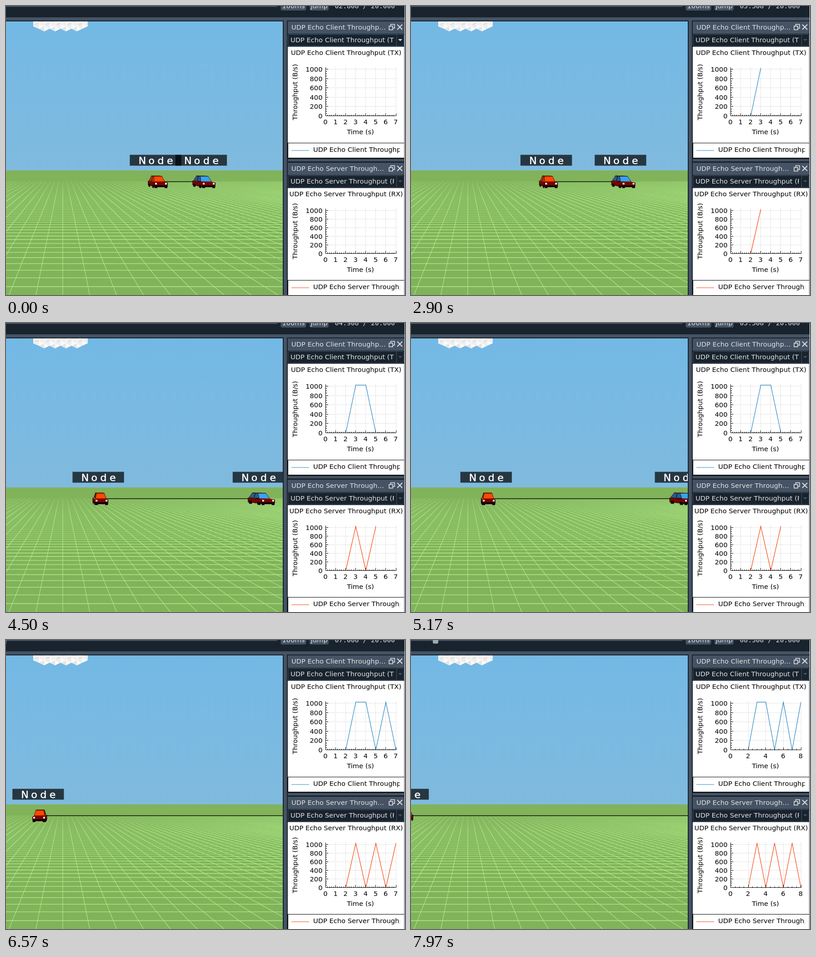
Recreate the animation shown at these times as an HTML page with a canvas. Size 878 by 638 pixels, loop 8 s.

```html
<!DOCTYPE html>
<html lang="en">
<head>
<meta charset="utf-8">
<title>Network simulation playback</title>
<style>
html, body { margin: 0; width: 100%; height: 100%; overflow: hidden; background: #19232d; }
canvas { display: block; }
</style>
</head>
<body>
<canvas id="stage" width="878" height="638"></canvas>
<script>
const c = document.getElementById('stage').getContext('2d');
const LOOP = 8000;
const DARK = '#19232d', SLATE = '#455364', LIGHT = '#e0e1e3';
const SANS = '14.667px "DejaVu Sans", sans-serif';
const MONO = '14.667px "DejaVu Sans Mono", monospace';
// Vanishing point, far edges of the ground and of its grid, depth of a car
const VX = 125, VY = 342, GROUND_Y = 363, GRID_Y = 387, DEPTH = 0.068;

// [time in ms, step count]; one step is a tenth of a simulated second
const SCENE = [[2170, 0], [2970, 6], [3430, 11], [4370, 19], [4500, 20], [4830, 23],
  [5700, 32], [5830, 33], [6230, 38], [6430, 40], [6570, 41], [7970, 55]];
const CLOCK = [[2169, 0], [2170, 1], [3430, 12], [4500, 21], [5830, 33.4], [6570, 42], [7970, 55.4]];
const SAMPLE_AT = [2300, 3420, 4480, 5630, 6570, 7600];
const CLIENT = [0, 1, 1, 0, 1, 0, 1], SERVER = [0, 1, 0, 1, 0, 1, 0];

function stepAt(keys, t) {
  if (t <= keys[0][0]) return keys[0][1];
  for (let i = 1; i < keys.length; i++) {
    const [t0, v0] = keys[i - 1], [t1, v1] = keys[i];
    if (t <= t1) return Math.floor(v0 + (v1 - v0) * (t - t0) / (t1 - t0) + 1e-6);
  }
  return Math.floor(keys[keys.length - 1][1]);
}

const snap = v => Math.floor(v) + 0.5;

function box(color, x, y, w, h) {
  c.fillStyle = color;
  c.fillRect(x, y, w, h);
}

function round(color, x, y, w, h, r) {
  c.fillStyle = color;
  c.beginPath();
  c.roundRect(x, y, w, h, r);
  c.fill();
}

function trace(points) {
  c.beginPath();
  points.forEach(([x, y], i) => i ? c.lineTo(x, y) : c.moveTo(x, y));
}

function poly(points, fill, edge) {
  trace(points);
  c.closePath();
  c.fillStyle = fill;
  c.fill();
  if (edge) {
    c.strokeStyle = edge;
    c.lineWidth = 0.8;
    c.stroke();
  }
}

function line(points, color, width = 1) {
  trace(points);
  c.strokeStyle = color;
  c.lineWidth = width;
  c.stroke();
}

function text(s, x, y, color, align = 'left', font = SANS) {
  c.font = font;
  c.textAlign = align;
  c.fillStyle = color;
  c.fillText(s, x, y);
}

function clipped(x, y, w, h, draw) {
  c.save();
  c.beginPath();
  c.rect(x, y, w, h);
  c.clip();
  draw();
  c.restore();
}

function fade(y0, y1, from, to) {
  const g = c.createLinearGradient(0, y0, 0, y1);
  g.addColorStop(0, from);
  g.addColorStop(1, to);
  return g;
}

function cloud() {
  const edge = [[60, 34], [60, 45], [72, 50]];
  for (let x = 84; x <= 156; x += 24) edge.push([x, 56], [x + 12, 50]);
  edge.push([179.5, 45], [179.5, 34]);
  c.save();
  trace(edge);
  c.clip();
  box('#fafafa', 60, 34, 120, 23);
  for (let row = 0; row < 2; row++) {
    const cy = row ? 45 : 35;
    for (let cx = 60 + (row ? 0 : 12); cx < 190; cx += 24) {
      poly([[cx, cy], [cx - 12, cy + 6], [cx, cy + 11]], '#e5e5e5');
      poly([[cx, cy], [cx + 12, cy - 5], [cx + 12, cy + 6]], '#eeeeee');
      poly([[cx, cy], [cx - 12, cy - 5], [cx, cy - 10]], '#f0f0f0');
    }
  }
  c.restore();
}

function ground() {
  const cell = 0.2, rowStep = 2.7e-4, near = 300, far = GRID_Y - VY;
  box('#81b35b', 0, GROUND_Y, 610, 275);
  const ink = fade(GRID_Y - 2, 425, 'rgba(178,238,138,0.2)', 'rgba(178,238,138,0.95)');
  for (let d = near, n = 1; d > far; d = 1 / (1 / near + n++ * rowStep)) {
    const gap = d * d * rowStep;
    line([[0, VY + d], [610, VY + d]], ink, Math.min(1.3, gap * 0.2));
  }
  for (let j = -14; j < 56; j++) {
    const k = j * cell;
    line([[VX + k * far, VY + far], [VX + k * near, VY + near]], ink, 1.1);
  }
}

function car(cx, glass, sideGlass) {
  const p = (dx, y, z) => {
    const f = 1 - DEPTH * z;
    return [VX + (cx + dx - VX) * f, VY + (y - VY) * f];
  };
  const s = cx > VX ? -1 : 1;
  const wheel = (z, dx) => poly([p(dx, 396, z), p(dx, 402, z), p(dx, 402, z + 0.2), p(dx, 396, z + 0.2)], '#0a0a0a', '#0a0a0a');
  poly([p(-14, 395, 1), p(14, 395, 1), p(14, 400, 0), p(-14, 400, 0)], '#100404');
  poly([p(s * 14.5, 389, 0), p(s * 14.5, 399, 0), p(s * 14.5, 399, 1), p(s * 14.5, 389, 1)], '#780303', '#1a0000');
  wheel(0.72, s * 14.5);
  wheel(0.1, s * 14.5);
  poly([p(s * 12, 388, 0.25), p(s * 9, 377, 0.45), p(s * 9, 377, 0.85), p(s * 12, 388, 1)], sideGlass, '#200000');
  line([p(s * 12, 388, 0.62), p(s * 9, 377, 0.65)], '#300000', 1.2);
  poly([p(-9, 377, 0.45), p(9, 377, 0.45), p(9, 377, 0.85), p(-9, 377, 0.85)], '#8a0000', '#300000');
  poly([p(-14, 390, 0), p(14, 390, 0), p(12, 388.5, 0.25), p(-12, 388.5, 0.25)], '#c80808');
  poly([p(-12, 388.5, 0.25), p(12, 388.5, 0.25), p(9, 377, 0.45), p(-9, 377, 0.45)], glass, '#400000');
  poly([p(-14.5, 390, 0), p(14.5, 390, 0), p(14.5, 397, 0), p(-14.5, 397, 0)], '#7c0404', '#200000');
  for (const dx of [-11, 11]) {
    box('#ffffff', cx + dx - 2, 390.5, 4, 3.5);
    box('#0a0a0a', cx + dx - 3, 397, 6, 5);
  }
  box('#140505', cx - 14.5, 395.5, 29, 4.5);
}

function nodeLabel(x) {
  box('rgba(0,0,0,0.7)', x, 328.5, 113.3, 24);
  c.strokeStyle = '#fff';
  c.lineWidth = 0.5;
  [...'Node'].forEach((ch, i) => {
    const cx = x + 27.5 + i * 20.3;
    text(ch, cx, 349, '#fff', 'center', '22px "DejaVu Sans", sans-serif');
    c.strokeText(ch, cx, 349);
  });
}

function viewport(k) {
  box(fade(34, GROUND_Y, '#73b9e5', '#80bade'), 0, 34, 610, GROUND_Y - 34);
  cloud();
  ground();
  const left = 341 - 6.54 * k, right = 446 + 6.54 * k;
  line([[left, 387.8], [right - 10, 387.8]], '#0a0f08', 1.5);
  car(left, '#ff4a00', '#c93c08');
  car(right, '#33a5f2', '#235f92');
  nodeLabel(272.4 - 6.3 * k);
  nodeLabel(372.8 + 6.3 * k);
}

function toolbar(time) {
  box(DARK, 0, 0, 878, 34);
  box(SLATE, 0, 25, 878, 7);
  box(SLATE, 0, 0, 597, 2);
  round('#9da9b5', 48 + 45.5 * (time - 8.308), -5, 12, 13, 3);
  round(SLATE, 604.5, -10, 56, 20, 4);
  round(SLATE, 668, -10, 42, 20, 4);
  text('100ms', 607.5, 5, LIGHT);
  text('Jump', 670.5, 5, LIGHT);
  text(time.toFixed(3).padStart(6, '0') + ' / 20.000', 723.5, 5, LIGHT, 'left', MONO);
}

function dock(y, title, choice, focus, hot) {
  box(SLATE, 620, y, 256, 27);
  text(title, 628, y + 18, LIGHT);
  c.strokeStyle = LIGHT;
  c.lineWidth = 1.6;
  c.strokeRect(846.5, y + 6.5, 8.5, 8.5);
  box(SLATE, 842, y + 10, 9, 9);
  c.strokeRect(843, y + 10.5, 8, 8);
  line([[861, y + 7], [872, y + 18]], LIGHT, 2);
  line([[872, y + 7], [861, y + 18]], LIGHT, 2);
  box(DARK, 620, y + 27, 256, 29);
  c.strokeStyle = focus ? '#346792' : SLATE;
  c.lineWidth = 1;
  c.beginPath();
  c.roundRect(620.5, y + 28.5, 255, 26, 3);
  c.stroke();
  box(SLATE, 859, y + 29, 1, 25);
  clipped(622, y + 28, 232, 27, () => text(choice, 626, y + 46, LIGHT));
  poly([[863, y + 39], [872, y + 39], [867.5, y + 43.5]], hot ? LIGHT : SLATE);
}

function chart(o, shown) {
  const last = Math.max(7, shown), major = last > 7 ? 2 : 1, minor = last > 7 ? 0.5 : 0.2;
  const px = v => 703.5 + v * 154.5 / last;
  const py = v => o.base - v * o.unit / 200;
  const top = py(1040);
  box('#fff', 620, o.y, 256, o.legend - o.y);
  text(o.name + ' (' + o.dir + ')', 748.5, o.y + 18, '#000', 'center');

  c.setLineDash([1, 2]);
  for (let v = 200; v <= 1000; v += 200) line([[704, snap(py(v))], [858, snap(py(v))]], '#b4b4b4');
  for (let v = major; v <= last; v += major) line([[snap(px(v)), top], [snap(px(v)), o.base]], '#b4b4b4');
  c.setLineDash([]);

  clipped(703, top, 155.5, o.base - top + 1, () => {
    const pts = o.data.slice(0, shown - 1).map((v, i) => [px(i + 2), py(v * 1024)]);
    if (pts.length > 1) line(pts, o.color, 1.2);
  });

  line([[703.5, top], [703.5, o.base], [858.5, o.base]], '#000');
  for (let v = 0; v <= 1000; v += 50) {
    const big = v % 200 === 0, y = snap(py(v));
    line([[704, y], [big ? 709 : 706, y]], '#000');
    if (big) text(v, 696.5, py(v) + 5.5, '#000', 'right');
  }
  for (let v = 0; v <= last + 0.01; v += minor) {
    const big = Math.abs(v / major - Math.round(v / major)) < 0.01, x = snap(px(v));
    line([[x, o.base], [x, o.base - (big ? 5.5 : 2.5)]], '#000');
    if (big) text(Math.round(v), px(v) - 0.5, o.base + 18, '#000', 'center');
  }
  text('Time (s)', 780, o.base + 40, '#000', 'center');
  c.save();
  c.translate(641, o.mid);
  c.rotate(-Math.PI / 2);
  text('Throughput (B/s)', 0, 0, '#000', 'center');
  c.restore();

  box('#fff', 620, o.legend, 256, 34);
  c.strokeStyle = '#000';
  c.lineWidth = 1;
  c.strokeRect(620.5, o.legend + 0.5, 256, 33);
  line([[628, o.legend + 17], [667, o.legend + 17]], o.color, 1.2);
  clipped(670, o.legend, 196.5, 33, () => text(o.name, 676, o.legend + 20, '#000'));
}

const charts = [
  { y: 90, base: 242.5, unit: 20.6, mid: 190, legend: 302, name: 'UDP Echo Client Throughput', dir: 'TX', data: CLIENT, color: '#2485c4' },
  { y: 402, base: 546.5, unit: 19.1, mid: 497, legend: 605, name: 'UDP Echo Server Throughput', dir: 'RX', data: SERVER, color: '#f8430c' }
];

function pointer(x, y) {
  poly([[x, y], [x, y + 21], [x + 5, y + 17], [x + 9, y + 25], [x + 13, y + 23],
    [x + 9, y + 15], [x + 16, y + 14]], '#000');
}

function draw(t) {
  const time = 2.808 + stepAt(CLOCK, t) / 10;
  const shown = 2 + SAMPLE_AT.filter(at => t >= at).length;
  box(DARK, 0, 0, 878, 638);
  clipped(0, 34, 609, 604, () => viewport(stepAt(SCENE, t)));
  toolbar(time);
  box(SLATE, 611, 25, 7, 613);
  charts.forEach(o => chart(o, shown));
  box(SLATE, 620, 338, 256, 5);
  dock(34, 'UDP Echo Client Throughp…', 'UDP Echo Client Throughput (TX)', t < 1030, t < 770);
  dock(346, 'UDP Echo Server Through…', 'UDP Echo Server Throughput (RX)', false, false);
  box(SLATE, 876, 34, 1, 604);
  box('#e4e6e8', 877, 0, 1, 638);
  if (t >= 500 && t < 570) pointer(846, 574);
  if (t >= 3230 && t < 3640) pointer(853, 628);
}

function tick(now) {
  draw(now % LOOP);
  requestAnimationFrame(tick);
}
draw(0);
requestAnimationFrame(tick);
</script>
</body>
</html>
```
